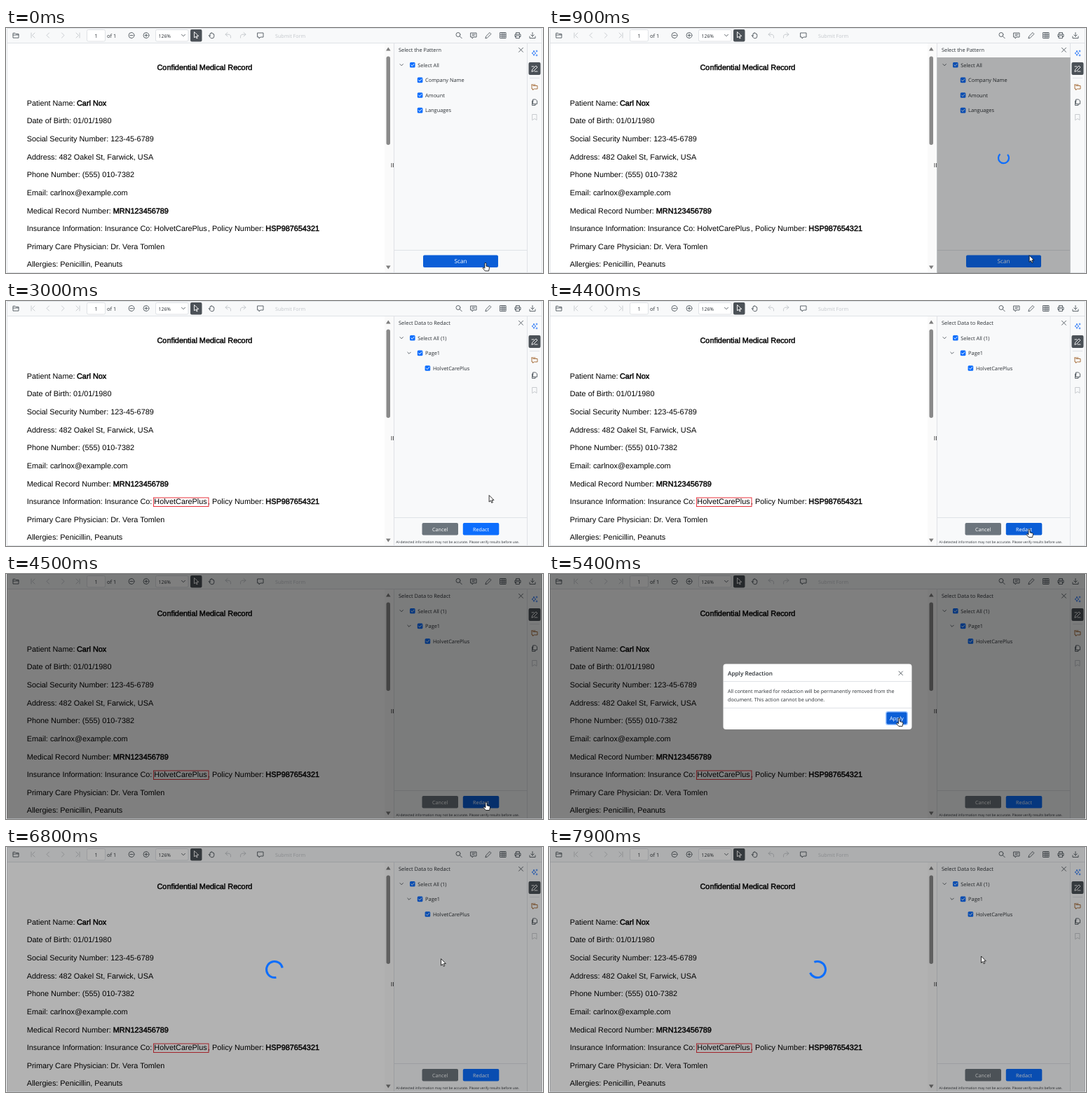
Write an HTML page that moves like this. It is 766 px wide and 350 px high and loops after 8 s.

```html
<!DOCTYPE html>
<html lang="en">
<head>
<meta charset="utf-8">
<title>Redaction panel</title>
<style>
  html, body { margin: 0; width: 100%; height: 100%; overflow: hidden; background: #fff }
  svg { display: block; width: 766px; height: 350px }
  text { font: 7.4px "Open Sans", "Noto Sans", sans-serif; fill: #2b3035; text-rendering: geometricPrecision }
  .doc text { font: 10.86px "Liberation Sans", Arial, sans-serif; fill: #000 }
  .doc .b { stroke: #000; stroke-width: .45 }
  .mid { text-anchor: middle }
  .icon { fill: none; stroke: #50575e; stroke-width: .9; stroke-linecap: round; stroke-linejoin: round }
  .off { stroke: #c3c7cb }
  .light { stroke: #fff }
  .blue { stroke: #2f7bf6 }
  .brown { stroke: #a0632c }
  .line { fill: none; stroke: #dfe2e6 }
  .spin { fill: none; stroke: #0d6efd }
  .cursor { fill: #fff; stroke: #000; stroke-width: .8; stroke-linejoin: round }
</style>
</head>
<body>
<svg viewBox="0 0 766 350">
  <rect width="766" height="350" fill="#fff"/>
  <rect x="1" width="764" height="21.5" fill="#f8f9fa"/>
  <rect x="540" y="22" width="13" height="328" fill="#fafafa"/>
  <rect x="553" y="22" width="212" height="328" fill="#f8f9fa"/>
  <path class="line" d="M1.5 350V.5H764.5V350M1 21.5H765M553.5 22V350M743.5 22V350M1 349.5H765M747 71.5h14"/>

  <g id="toolbar">
    <rect x="115.5" y="2.500" width="26" height="16.500" rx="2" fill="#fff" stroke="#dfe2e6"/>
    <rect x="213.500" y="2.500" width="46.500" height="16.500" rx="2" fill="#fff" stroke="#dfe2e6"/>
    <rect x="263" y="2" width="16.500" height="17.500" rx="2" fill="#4b5157"/>
    <rect x="745.5" y="49" width="17" height="18" rx="2" fill="#4b5157"/>
    <text class="mid" x="128.500" y="13.500">1</text>
    <text x="144" y="13.500">of 1</text>
    <text x="217.500" y="13.500" style="font-size:6.900px">126%</text>
    <text x="384" y="13.500" style="font-size:7.150px;fill:#c3c7cb">Submit Form</text>
  </g>

  <g class="doc">
    <text class="b" x="215.500" y="59.700">Confidential Medical Record</text>
    <g id="record"></g>
    <rect id="mark" x="210.500" y="281" width="78.500" height="12.500" fill="none" stroke="#e8323c"/>
  </g>

  <rect x="542.500" y="40.500" width="5.500" height="126.500" rx="2.700" fill="#8a8a8a"/>
  <path d="M542 32.500l3.300-5 3.300 5zM542 339.500l3.300 5 3.300-5z" fill="#7d7d7d"/>
  <path d="M550 193v6M552.500 193v6" stroke="#555" stroke-width="1"/>
  <path class="icon" d="M731.500 28.300l6 6m0-6l-6 6"/>

  <g id="patterns">
    <text x="560" y="34.200">Select the Pattern</text>
    <path class="line" d="M554 317.500H743"/>
    <rect id="scan" x="595" y="324.500" width="107" height="17.500" rx="2"/>
    <text class="mid" x="648.500" y="336.300" style="font-size:8.200px;fill:#fff">Scan</text>
  </g>
  <g id="results">
    <text x="560" y="34.200" style="font-size:7.500px">Select Data to Redact</text>
    <path class="line" d="M554 309.500H743"/>
    <rect x="593.500" y="317" width="51.500" height="17.500" rx="2" fill="#6c757d"/>
    <rect id="redact" x="651.800" y="317" width="51.500" height="17.500" rx="2"/>
    <text class="mid" x="619.200" y="328.500" style="font-size:7.200px;fill:#fff">Cancel</text>
    <text class="mid" x="677.500" y="328.500" style="font-size:7.200px;fill:#fff">Redact</text>
    <text x="556.500" y="346" style="font-size:4.870px">AI-detected information may not be accurate. Please verify results before use.</text>
  </g>

  <rect id="panelShade" x="553.500" y="42" width="190" height="308" fill-opacity=".3"/>
  <rect id="pageShade" x="1" width="764" height="349.500"/>
  <path id="panelSpin" class="spin" stroke-width="2.200" d="M0-7.500A7.500 7.500 0 1 1-7.500 0"/>
  <path id="pageSpin" class="spin" stroke-width="3" d="M0-11.500A11.500 11.500 0 1 1-11.500 0"/>

  <g id="dialog">
    <rect x="248.500" y="128.500" width="269" height="93.500" rx="4" fill="#fff"/>
    <path class="line" d="M249 153.500H517M249 191.500H517"/>
    <text x="255" y="144.500" style="font-size:8.200px;font-weight:600">Apply Redaction</text>
    <path class="icon" d="M499 139l5.500 5.500m0-5.500l-5.500 5.500"/>
    <text x="255" y="170" style="font-size:7.150px">All content marked for redaction will be permanently removed from the</text>
    <text x="255" y="181.500" style="font-size:7.150px">document. This action cannot be undone.</text>
    <rect x="480" y="196" width="32" height="20" rx="3.500" fill="#9ec5fe"/>
    <rect id="apply" x="481.500" y="197.500" width="29" height="17" rx="2"/>
    <text class="mid" x="496" y="208.800" style="font-size:7.600px;fill:#fff">Apply</text>
  </g>

  <path id="arrow" class="cursor" d="M0 0v9.500l2.200-2 1.500 3.300 1.500-.7-1.400-3.200h3z"/>
  <path id="hand" class="cursor" d="M-1.100 1a1.100 1.100 0 0 1 2.200 0v3.800l3.400.8q1.200.4 1 1.700l-.9 4.200h-5.200l-3.400-4q.4-1.400 1.800-.5l1.100.8z"/>
</svg>
<script>
const $ = id => document.getElementById(id);
const add = (id, markup) => $(id).insertAdjacentHTML('beforeend', markup);

const bubble = 'M-4-3.500h8v6h-4l-2 2v-2h-2z';
const pen = 'M-4 4l.8-2.800L2-4l2 2-5.200 5.200z';
const ring = 'M4 0A4 4 0 1 1-4 0 4 4 0 1 1 4 0M-2 0h4';
const icons = [
  [14, 10.5, 'M-4 3.200v-6.400h3l1 1.200h4v5.200zM-4-.5h8'],
  [39, 10.5, 'M2-3.500l-3.500 3.500 3.500 3.500M-3-3.500v7', 'off'],
  [60, 10.5, 'M1.500-3.500l-3.500 3.500 3.500 3.500', 'off'],
  [81, 10.5, 'M-1.500-3.500l3.500 3.500-3.500 3.500', 'off'],
  [102, 10.5, 'M-2-3.500l3.500 3.500-3.500 3.500M3-3.500v7', 'off'],
  [179, 10.5, ring],
  [200, 10.5, ring + 'M0-2v4'],
  [253, 10.5, 'M-2.500-1.200l2.500 2.500 2.500-2.500'],
  [271, 10.5, 'M-2.500-4.500v8l2-2 1.500 3 1.200-.6-1.400-2.900h2.700z', 'light'],
  [293, 10.5, 'M-2 1v-3.500q.8-1 1.500 0v-1q.8-1 1.500 0v1q.8-1 1.500 0v1q.8-.8 1.300 0v3q0 2.800-3 2.800-2 0-3-1.800l-1.500-2.500q.7-.8 1.700 1'],
  [317, 10.5, 'M-1-4l-3 2.700 3 2.700M-4-1.300h5q3 .5 2.500 4.800', 'off'],
  [338, 10.5, 'M1-4l3 2.700-3 2.700M4-1.300h-5q-3 .5-2.500 4.800', 'off'],
  [363, 10.5, bubble],
  [646, 10.5, 'M2-1a3 3 0 1 1-6 0 3 3 0 1 1 6 0M1.200 1.200l3 3'],
  [667, 10.5, bubble + 'M-2-1.500h4M-2 .5h3'],
  [688, 10.5, pen],
  [709, 10.5, 'M-4-4h8v8h-8zM-4-1.300h8M-4 1.300h8M-1.300-4v8M1.300-4v8'],
  [730, 10.5, 'M-2.500-1.500v-2.500h5v2.500M-2.500 2h-1.500v-3.500h8v3.500h-1.500M-2.500.5h5v3.500h-5z'],
  [751, 10.5, 'M0-4v5.500M-2.200-.7l2.200 2.200 2.200-2.200M-4 1.500v2.500h8v-2.500'],
  [754, 36, 'M-1-3.500q.3 3 3 3.500-2.700.5-3 3.500-.3-3-3-3.500 2.700-.5 3-3.500M3-4v2M2-3h2M3 2v2M2 3h2', 'blue'],
  [754, 58, pen + 'M0 4h4M-4-3h3', 'light'],
  [754, 84.500, 'M-4-3.500h5M-4-3.500v6h1.500v1.500l2-1.500h4.500v-4.500h-6', 'brown'],
  [754, 106, 'M-2-4h3.500l2 2v4.500h-5.500zM-2-2h-1.500v6.500h4.500v-2'],
  [754, 127.500, 'M-3-4h6v8l-3-2-3 2z', 'off'],
];
add('toolbar', icons.map(([x, y, d, tone = '']) =>
  `<path class="icon ${tone}" transform="translate(${x} ${y})" d="${d}"/>`).join(''));

const company = 'HolvetCarePlus';
const bold = (text, x = '') => `<tspan class="b"${x && ` x="${x}"`}>${text}</tspan>`;
const record = [
  'Patient Name: ' + bold('Carl Nox', 101),
  'Date of Birth: 01/01/1980',
  'Social Security Number: 123-45-6789',
  'Address: 482 Oakel St, Farwick, USA',
  'Phone Number: (555) 010-7382',
  'Email: carlnox@example.com',
  'Medical Record Number: ' + bold('MRN123456789'),
  `Insurance Information: Insurance Co: <tspan x="211.300">${company}</tspan><tspan x="288">, Policy Number: </tspan>` + bold('HSP987654321', 370.3),
  'Primary Care Physician: Dr. Vera Tomlen',
  'Allergies: Penicillin, Peanuts',
];
add('record', record.map((row, i) => `<text x="29.700" y="${110.8 + 25.63 * i}">${row}</text>`).join(''));

// One checkbox row of the tree, with an optional expand chevron.
const treeRow = (label, level, row, open) => {
  const x = 576 + 10.8 * level, y = 52.8 + 21.6 * row;
  return `<rect x="${x}" y="${y - 3.8}" width="7.600" height="7.600" rx="1.500" fill="#0d6efd"/>
    <path class="icon light" d="M${x + 1.8} ${y}l1.500 1.600 2.800-3.200"/>
    ${open ? `<path class="icon" d="M${x - 14} ${y - 1.2}l2.200 2.200 2.200-2.200"/>` : ''}
    <text x="${x + 11.3}" y="${y + 2.7}">${label}</text>`;
};
add('patterns', treeRow('Select All', 0, 0, true) +
  ['Company Name', 'Amount', 'Languages'].map((label, i) => treeRow(label, 1, i + 1)).join(''));
add('results', treeRow('Select All (1)', 0, 0, true) + treeRow('Page1', 1, 1, true) + treeRow(company, 2, 2));

// Pointer stops: time, x, y.
const path = [
  [0, 684, 335.500], [700, 684, 335.500], [1600, 693, 250.500], [2500, 693, 250.500], [2600, 692.500, 248],
  [2700, 692.500, 248], [3400, 684, 323], [3800, 684, 323], [4100, 685, 326], [4500, 685, 326],
  [5100, 503, 229], [5400, 499.500, 206], [5700, 499.500, 206], [6500, 622, 161], [7400, 616.500, 156],
];
const LOOP = 8000;
const clamp = v => Math.max(0, Math.min(1, v));
const ease = v => v * v * (3 - 2 * v);
const show = (id, on) => $(id).style.display = on ? '' : 'none';
const place = (id, x, y, more = '') => $(id).setAttribute('transform', `translate(${x} ${y}) ${more}`);
const tint = (id, hover) => $(id).setAttribute('fill', hover ? '#0b5ed7' : '#0d6efd');

function pointerAt(t) {
  const next = path.findIndex(p => p[0] > t);
  if (next < 0) return path[path.length - 1].slice(1);
  const [t0, x0, y0] = path[next - 1], [t1, x1, y1] = path[next];
  const k = ease((t - t0) / (t1 - t0));
  return [x0 + (x1 - x0) * k, y0 + (y1 - y0) * k];
}

function draw(t) {
  const scanning = t >= 700 && t < 2800, found = t >= 2800;
  const asking = t >= 4500 && t < 5700, applying = t >= 5700;
  show('patterns', !found);
  show('results', found);
  show('mark', t >= 1600);
  show('panelShade', scanning);
  show('panelSpin', scanning);
  show('pageShade', asking || applying);
  $('pageShade').setAttribute('fill-opacity', asking ? .5 : .3);
  show('pageSpin', applying);

  const turn = start => `rotate(${(t - start) / 750 * 360})`;
  place('panelSpin', 648.5, 185.7, turn(2300));
  place('pageSpin', 383, 175, turn(5700));

  const zoom = ease(clamp((t - 4500) / 300));
  show('dialog', asking && zoom > 0);
  $('dialog').setAttribute('opacity', zoom);
  place('dialog', 383, 175, `scale(${zoom}) translate(-383 -175)`);

  tint('scan', t < 700);
  tint('redact', t >= 3400 && t < 4600);
  tint('apply', t >= 5300);

  const [x, y] = pointerAt(t);
  const pointing = t < 700 || (t >= 3400 && t < 4600) || (t >= 5300 && t < 5700);
  show('hand', pointing);
  show('arrow', !pointing);
  place(pointing ? 'hand' : 'arrow', x, y);
}

function tick() {
  draw(Math.floor(performance.now() % LOOP / 100) * 100);
  requestAnimationFrame(tick);
}
tick();
</script>
</body>
</html>
```
